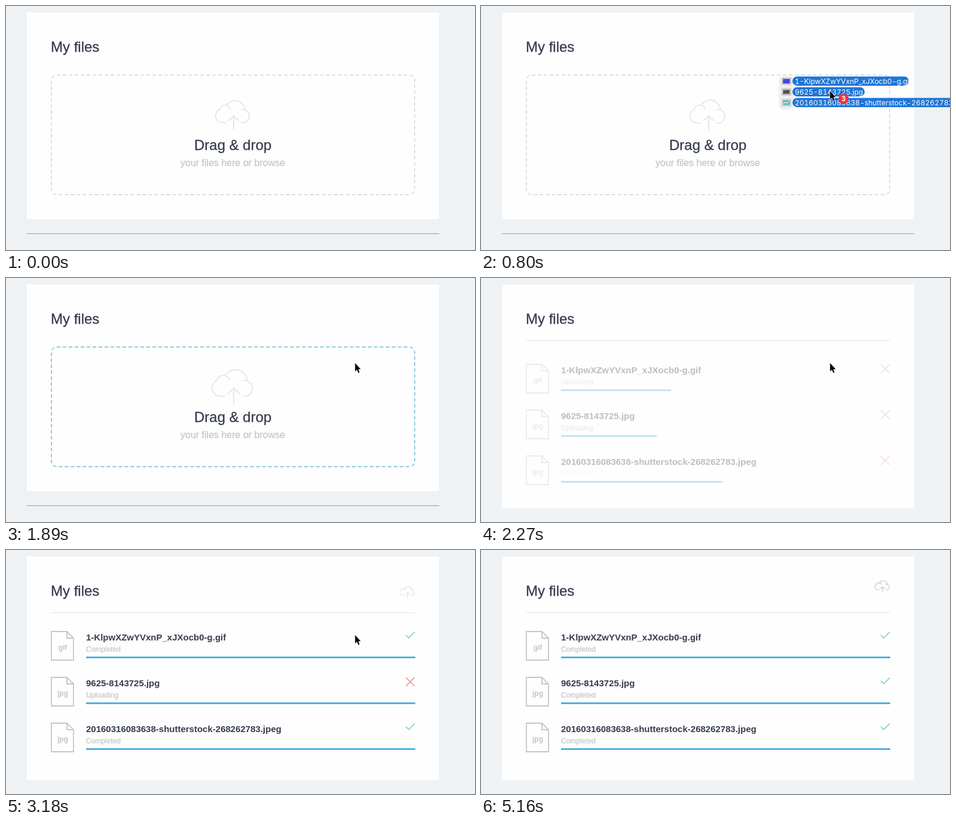
Animation of 785 by 410 pixels, one loop 5.76 s. Source, as an HTML page:

```html
<!DOCTYPE html>
<html lang="en">
<head>
<meta charset="utf-8">
<title>My files</title>
<style>
html, body { margin: 0; width: 100%; height: 100%; overflow: hidden; background: #eef2f5; }
#card, #zone, svg { position: absolute; box-sizing: border-box; }
#card { left: 35px; top: 11px; width: 690px; background: #fefefe; }
#zone { left: 75px; top: 115px; width: 610px; height: 203px; border: 2px dashed; border-radius: 10px; }
svg { left: 0; top: 0; }
text { font-family: "Liberation Sans", Arial, sans-serif; }
.title { font-size: 24px; fill: #353c4e; stroke: #353c4e; stroke-width: .3; }
.hint { font-size: 16px; fill: #c5c5c5; stroke: #c5c5c5; stroke-width: .25; }
.name { font-size: 15px; font-weight: bold; fill: #353c4e; }
.note { font-size: 12px; fill: #c3c3c3; stroke: #c3c3c3; stroke-width: .2; }
.ext { font-size: 12px; font-weight: bold; fill: #c4c4c4; text-anchor: middle; }
.line { fill: none; stroke-linecap: round; }
.tag { font: 12px Inter, sans-serif; font-variant-numeric: tabular-nums; fill: #fff; }
</style>
</head>
<body>
<div id="card"></div>
<div id="zone"></div>
<svg width="785" height="410" viewBox="0 0 785 410">
  <defs>
    <path id="cloud" vector-effect="non-scaling-stroke" d="M-12 13H-18A11.5 11.5 0 0 1-22.5-9A9 9 0 0 1-5-9.5M-10-17A16.5 16.5 0 0 1 20-8M14.5-9A11.2 11.2 0 0 1 17.5 13.2H14M1 25V1.5M-7.5 9.5L1 1.5L9.5 9.5"/>
  </defs>
  <text class="title" x="75" y="77">My files</text>
  <g id="drop">
    <g id="bigCloud" class="line" stroke="#e7e7e7" stroke-width="2"><use href="#cloud"/></g>
    <text class="title" x="315" y="242">Drag &amp; drop</text>
    <text class="hint" x="292" y="269">your files here or browse</text>
    <rect x="35" y="382" width="690" height="1" fill="#959c9f"/>
  </g>
  <g id="list">
    <rect x="75" y="105" width="610" height="1" fill="#e1e2e4"/>
    <g id="rows"></g>
  </g>
  <g id="smallCloud" class="line" stroke="#c8c8c8" stroke-width="1.2"><use href="#cloud"/></g>
  <g id="ghost"></g>
  <g id="cursor">
    <path d="M0 0V14L3.1 11.1L5.3 16.4L7.5 15.4L5.3 10.3H9.4Z" stroke="#fff" stroke-width="1.4" paint-order="stroke"/>
    <g id="badge">
      <circle cx="22.5" cy="13" r="8.5" fill="#ef3540"/>
      <text x="22.5" y="17.3" text-anchor="middle" font-size="12" font-weight="bold" fill="#fff">3</text>
    </g>
  </g>
</svg>
<script>
const LOOP = 5760;
// The picture advances in short bursts of even steps: from, to, steps.
const BURSTS = [[0, 650, 1], [777, 1030, 2], [1890, 2090, 1], [2247, 2560, 2], [2740, 2950, 1],
  [3065, 3180, 1], [3330, 3720, 3], [3870, 3980, 1], [4130, 4430, 2], [4720, 5160, 5]];

// done: when the upload is confirmed; load: how long the bar takes to fill.
const FILES = [
  { name: '1-KlpwXZwYVxnP_xJXocb0-g.gif', ext: 'gif', done: 2560, load: 470, pill: 195 },
  { name: '9625-8143725.jpg', ext: 'jpg', done: 3870, load: 540, pill: 121 },
  { name: '20160316083638-shutterstock-268262783.jpeg', ext: 'jpg', done: 2395, load: 320, pill: 300 }
];

const $ = id => document.getElementById(id);
const part = (t, from, to) => Math.min(1, Math.max(0, (t - from) / (to - from)));
const smooth = p => p * p * (3 - 2 * p);
const mix = (a, b, p) => a + (b - a) * p;

function add(parent, tag, attrs, text) {
  const el = document.createElementNS('http://www.w3.org/2000/svg', tag);
  for (const k in attrs) el.setAttribute(k, attrs[k]);
  if (text) el.textContent = text;
  return parent.appendChild(el);
}
const move = (el, x, y, rest = '') => el.setAttribute('transform', `translate(${x} ${y})${rest}`);
const fade = (el, opacity) => el.setAttribute('opacity', opacity);
const show = (el, on) => { el.style.display = on ? '' : 'none'; };

const rows = FILES.map((file, i) => {
  const g = add($('rows'), 'g', { transform: `translate(0 ${77 * i})` });
  add(g, 'path', { d: 'M76 137H102L113 148V185H76ZM102 137V148H113', fill: 'none', stroke: '#c6c6c6', 'stroke-width': 1.8 });
  add(g, 'text', { class: 'ext', x: 95, y: 168 }, file.ext);
  add(g, 'text', { class: 'name', x: 134, y: 152 }, file.name);
  return {
    file,
    before: add(g, 'text', { class: 'note', x: 134, y: 171 }, 'Uploading'),
    after: add(g, 'text', { class: 'note', x: 134, y: 171 }, 'Completed'),
    bar: add(g, 'rect', { x: 134, y: 179, height: 3, fill: '#4db3e1' }),
    cross: add(g, 'path', { class: 'line', d: 'M-7-7L7 7M7-7L-7 7', stroke: '#f28482', 'stroke-width': 1.4 }),
    check: add(g, 'path', { class: 'line', d: 'M-7 .3L-2.6 4.8L7.3-5', stroke: '#79cbb0', 'stroke-width': 1.5 })
  };
});

function buildGhost() {
  const g = $('ghost');
  add(g, 'rect', { x: 498, y: 117, width: 25, height: 57, rx: 9, fill: '#ededed', opacity: .8 });
  ['#4747e0', '#77706e', '#58b5b0'].forEach((color, i) => {
    const y = 18 * i;
    add(g, 'rect', { x: 503.5, y: 120.5 + y, width: 15, height: 11, fill: '#f4f4f4', stroke: '#b5b5b5' });
    add(g, 'rect', { x: 505, y: 122 + y, width: 12, height: 8, fill: color });
    if (i) add(g, 'path', { d: `M506 ${128 + y}l3-3 3 2 3-3`, fill: 'none', stroke: i > 1 ? '#d8eeee' : '#343030', 'stroke-width': 1.5 });
    add(g, 'rect', { x: 521, y: 118 + y, width: FILES[i].pill, height: 15.5, rx: 7.75, fill: '#1f75d8' });
    add(g, 'text', { class: 'tag', x: 525, y: 130.2 + y }, FILES[i].name);
  });
}

function drawRow({ file, before, after, bar, cross, check }, t) {
  const s = t - file.done;
  const leave = part(s, -390, -60), enter = smooth(part(s, -20, 380));
  const shut = part(s, -100, 200), open = smooth(part(s, 20, 440));
  bar.setAttribute('width', 551 * part(t, 2090, 2090 + file.load));
  fade(before, 1 - leave);
  move(before, 0, -4 * leave);
  fade(after, part(s, -150, 410));
  move(after, 0, 13 * (1 - enter));
  fade(cross, 1 - shut);
  move(cross, 676.5, 144.6, ` rotate(${135 * shut}) scale(${1 - .6 * shut})`);
  fade(check, part(s, 20, 340));
  move(check, 676.6, 143, ` rotate(${90 * (open - 1)}) scale(${.7 + .3 * open})`);
}

function drawCursor(t) {
  const lag = (1 - part(t, 650, 1030)) ** 6;
  const arrive = part(t, 650, 777), leave = part(t, 4650, 5100) ** 2;
  move($('ghost'), mix(-12, 128, lag), mix(5, -48, lag));
  move($('cursor'), mix(700, 584.3, arrive) + 133 * leave, mix(125, 143, arrive) + 245 * leave);
}

function draw(t) {
  const listed = t >= 2090, dragging = t >= 650 && t < 1890;
  $('card').style.height = (listed ? 376 : 347) + 'px';
  show($('zone'), !listed);
  show($('drop'), !listed);
  show($('list'), listed);
  show($('ghost'), dragging);
  show($('badge'), dragging);
  show($('cursor'), t >= 650 && t < 5160);
  drawCursor(t);

  const tint = part(t, 777, 1030);
  $('zone').style.borderColor = `rgb(${mix(222, 143, tint)},${mix(222, 203, tint)},222)`;
  move($('bigCloud'), 380, 183, ` scale(${1 + .2 * smooth(part(t, 650, 1100))})`);

  move($('rows'), 0, 16 * (1 - part(t, 2090, 2740)) ** 2.5);
  fade($('rows'), smooth(part(t, 2090, 2500)));
  rows.forEach(row => drawRow(row, t));
  move($('smallCloud'), 671.7, 61.3 + 19 * (1 - part(t, 2950, 3600)) ** 1.5, ' scale(.425 .4)');
  fade($('smallCloud'), part(t, 2950, 3400));
}

function hold(t) {
  const [from, to, steps] = BURSTS.filter(b => b[0] <= t).pop();
  return from + Math.floor(part(t, from, to) * steps) / steps * (to - from);
}

buildGhost();
const start = performance.now();
function tick() {
  draw(hold((performance.now() - start) % LOOP));
  requestAnimationFrame(tick);
}
tick();
</script>
</body>
</html>
```
